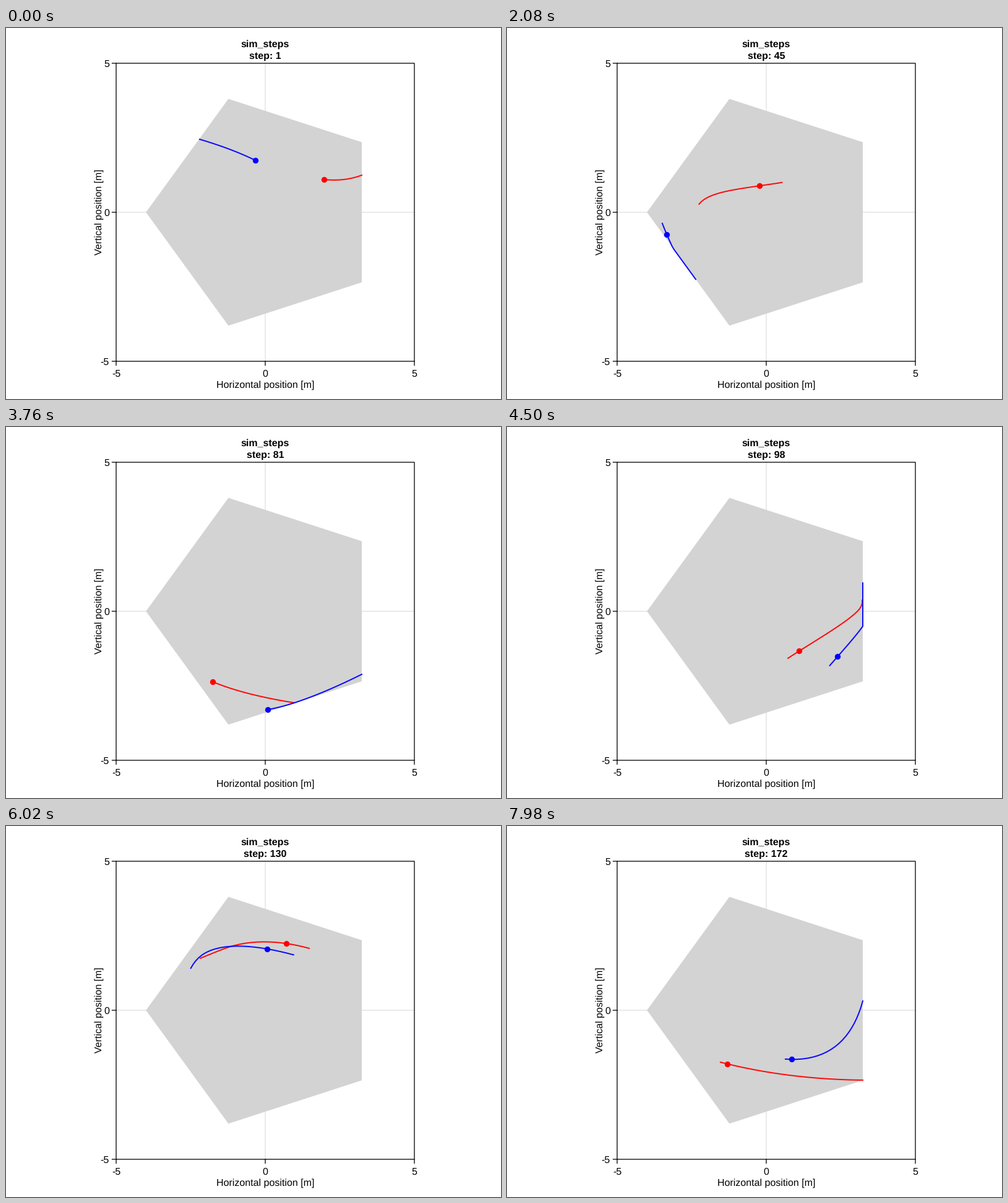
Recreate the animation shown at these times as a matplotlib script. Size 800 px wide and 600 px high, loop 8 s.

```python
import numpy as np
import matplotlib.pyplot as plt
from matplotlib.animation import FuncAnimation
from matplotlib.patches import Polygon, Rectangle

plt.rcParams["text.hinting"] = "none"

W, H, DPI = 800, 600, 100
PX = 72 / DPI                      # points per pixel
TICK, LOOP = 20, 8000              # ms
TURN, HORIZON = 5, 20              # steps between plans, steps per plan
CENTER, UNIT = np.array([419, 298]), 48.2

# Key plans: the step each begins at, and where it starts, passes and ends.
KEY_STEPS = [1, 26, 61, 81, 111, 141, 171]
KEY_PLANS = {
    "red": [
        [(514, 245), (546, 245), (575, 238)],
        [(548, 260), (503, 226), (418, 190)],
        [(300, 313), (299, 365), (330, 440)],
        [(334, 412), (392, 431), (466, 446)],
        [(554, 271), (556, 212), (516, 166)],
        [(340, 217), (266, 266), (227, 298)],
        [(345, 382), (456, 403), (575, 411)]],
    "blue": [
        [(403, 214), (361, 196), (313, 180)],
        [(259, 253), (240, 291), (249, 332)],
        [(318, 411), (357, 449), (392, 470)],
        [(423, 457), (489, 438), (575, 400)],
        [(570, 278), (540, 217), (472, 151)],
        [(325, 210), (286, 270), (283, 377)],
        [(450, 377), (530, 357), (575, 283)]],
}
MIXED = 5                          # key plan with two options per player


def ring(degrees):
    a = np.radians(degrees)
    return np.column_stack([np.cos(a), np.sin(a)])


CORNERS = CENTER + 4 * UNIT * ring(180 + 72 * np.arange(5))
NORMALS = ring(72 * np.arange(5))
APOTHEM = 4 * UNIT * np.cos(np.pi / 5)


def keep_inside(pts):
    for n in NORMALS:
        over = np.maximum((pts - CENTER) @ n - APOTHEM, 0)
        pts = pts - over[:, None] * n
    return pts


def arc(start, bend, end):
    """Quadratic curve with one point per step of the horizon."""
    u = np.linspace(0, 1, HORIZON + 1)[:, None]
    return (1 - u) ** 2 * start + 2 * u * (1 - u) * bend + u * u * end


class Player:
    def __init__(self, name):
        start, mid, end = np.array(KEY_PLANS[name], float).swapaxes(0, 1)
        self.start, self.end = start, end
        self.bend = 2 * mid - (start + end) / 2
        # The route joins the plan starts, leaving each along its plan.
        self.time = np.append(KEY_STEPS, KEY_STEPS[-1] + HORIZON)
        self.pos = np.vstack([start, end[-1]])
        self.vel = np.vstack([self.bend - start,
                              end[-1] - self.bend[-1]]) * 2 / HORIZON
        self.drift = [arc(a, b, c) - self.route(t) for a, b, c, t
                      in zip(start, self.bend, end, KEY_STEPS)]

    def route(self, step):
        """Positions over the horizon that begins at the given step."""
        t = step + np.arange(HORIZON + 1)
        i = np.searchsorted(self.time, t, "right") - 1
        i = np.minimum(i, len(self.time) - 2)
        span = (self.time[i + 1] - self.time[i])[:, None]
        u = (t - self.time[i])[:, None] / span
        return (self.pos[i] * (1 + 2 * u) * (1 - u) ** 2
                + self.pos[i + 1] * u * u * (3 - 2 * u)
                + self.vel[i] * span * u * (1 - u) ** 2
                + self.vel[i + 1] * span * u * u * (u - 1))

    def plan(self, step):
        """Route ahead, straying from it as the nearest key plans do."""
        k = np.interp(step, KEY_STEPS, range(len(KEY_STEPS)))
        i = min(int(k), len(KEY_STEPS) - 2)
        drift = self.drift[i] + (k - i) * (self.drift[i + 1] - self.drift[i])
        return keep_inside(self.route(step) + drift)


def step_at(ms):
    """Steps last 20, 20 and 100 ms in turn."""
    cycle, rest = divmod(ms + 20, 140)
    return 3 * cycle + min(rest // 20, 2)


fig = plt.figure(figsize=(W / DPI, H / DPI), dpi=DPI, facecolor="white")
ax = fig.add_axes([0, 0, 1, 1])
ax.set(xlim=(0, W), ylim=(H, 0))
ax.axis("off")


def line(x, y, color="black", px=1.3, **kw):
    return ax.plot(x, y, color=color, lw=px * PX, snap=False, **kw)[0]


def label(x, y, text, ha="center", **kw):
    return ax.text(x, y, text, ha=ha, va="baseline", size=16 * PX,
                   family="Liberation Sans", rotation_mode="anchor", **kw)


line([419, 419], [57, 539], "#e0e0e0", zorder=1)
line([178, 660], [298, 298], "#e0e0e0", zorder=1)
ax.add_patch(Polygon(CORNERS, fc="#d3d3d3", ec="none", zorder=2))
ax.add_patch(Rectangle((178, 57), 482, 482, fill=False, ec="black",
                       lw=1.3 * PX, snap=False, zorder=3))

for k, text in enumerate(["-5", "0", "5"]):
    x, y = 178 + 241 * k, 539 - 241 * k
    line([x, x], [539, 545.5])
    line([171.5, 178], [y, y])
    label(x, 563.5, text)
    label(167, y + 5.5, text, ha="right")

label(419, 582, "Horizontal position [m]")
label(155, 298, "Vertical position [m]", rotation=90)
label(419, 31, "sim_steps", weight="bold")
counter = label(419, 50, "", weight="bold")

red, blue = Player("red"), Player("blue")
artists = []
for z, (name, me, foe) in enumerate([("red", red, blue), ("blue", blue, red)]):
    # The second option heads for the end of the other player's plan.
    option = arc(me.start[MIXED], me.bend[MIXED], foe.end[MIXED])
    artists.append((
        me,
        line(*keep_inside(option).T, name, 2, zorder=4, alpha=0.35),
        line([], [], name, 2, zorder=5 + z),
        line([], [], name, marker="o", ms=9.4 * PX, mew=0, zorder=7 + z)))


def draw(frame):
    step = step_at(frame * TICK)
    s = (step - 1) % TURN
    mixed = step - s == KEY_STEPS[MIXED]
    counter.set_text(f"step: {step}")
    for player, faint, path, dot in artists:
        plan = player.plan(step - s)
        faint.set_visible(mixed)
        path.set_data(*plan.T)
        path.set_alpha(0.75 if mixed else 0.95)
        dot.set_data(*plan[s:s + 1].T)
    return counter,


anim = FuncAnimation(fig, draw, frames=LOOP // TICK, interval=TICK,
                     repeat=True, repeat_delay=0, blit=False)
plt.show()
```
